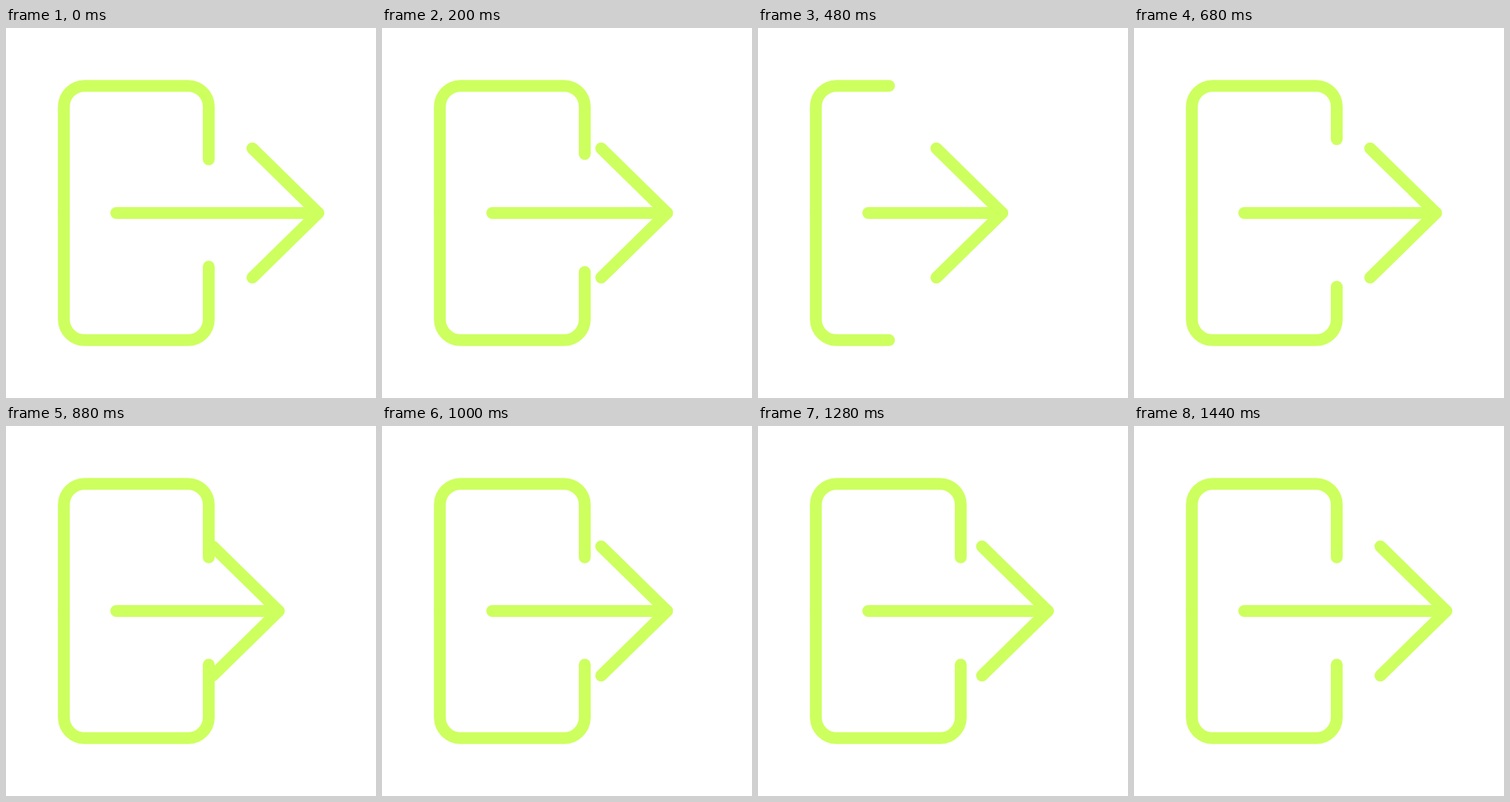
An HTML page without scripts for the animation above (2 s loop, 500 px wide and 500 px high).

```html
<!DOCTYPE html>
<html lang="en">
<head>
<meta charset="utf-8">
<title>Exit icon</title>
<style>
  @property --pull { syntax: "<length>"; inherits: true; initial-value: 0px; }
  @property --open { syntax: "<length>"; inherits: true; initial-value: 0px; }

  html, body { margin: 0; height: 100%; overflow: hidden; background: #fff; }

  svg {
    display: block;
    width: 100%;
    height: 100%;
    fill: none;
    stroke: #cdff5f;
    stroke-width: 16;
    stroke-linecap: round;
    stroke-linejoin: round;
    animation: pull 2s infinite, open 2s infinite;
    animation-timing-function: cubic-bezier(.333, 0, .667, 1);
  }

  .head { transform: translateX(calc(-1 * var(--pull))); }
  .shaft { stroke-dasharray: 273 500; stroke-dashoffset: var(--pull); }
  .door { stroke-dasharray: 443.2 500; stroke-dashoffset: var(--open); }

  /* The arrow draws back, then settles in two smaller bounces. */
  @keyframes pull {
    0%, 37.5%, 55.3%, 71.667%, 100% { --pull: 0px; }
    23.333% { --pull: 92.6px; }
    46% { --pull: 61.7px; }
    63.333% { --pull: 30.9px; }
  }

  @keyframes open {
    0%, 8.2%, 37.5%, 100% { --open: 0px; }
    23.333% { --open: 186px; }
  }
</style>
</head>
<body>
<svg viewBox="0 0 500 500">
  <defs>
    <path id="half" d="M78.2 250V106.2a28 28 0 0 1 28-28H246a28 28 0 0 1 28 28V177.5"/>
  </defs>
  <use class="door" href="#half"/>
  <use class="door" href="#half" transform="matrix(1 0 0 -1 0 500)"/>
  <path class="shaft" d="M149 250H422"/>
  <path class="head" d="M333 162.7L422 250L333 337.3"/>
</svg>
</body>
</html>
```
